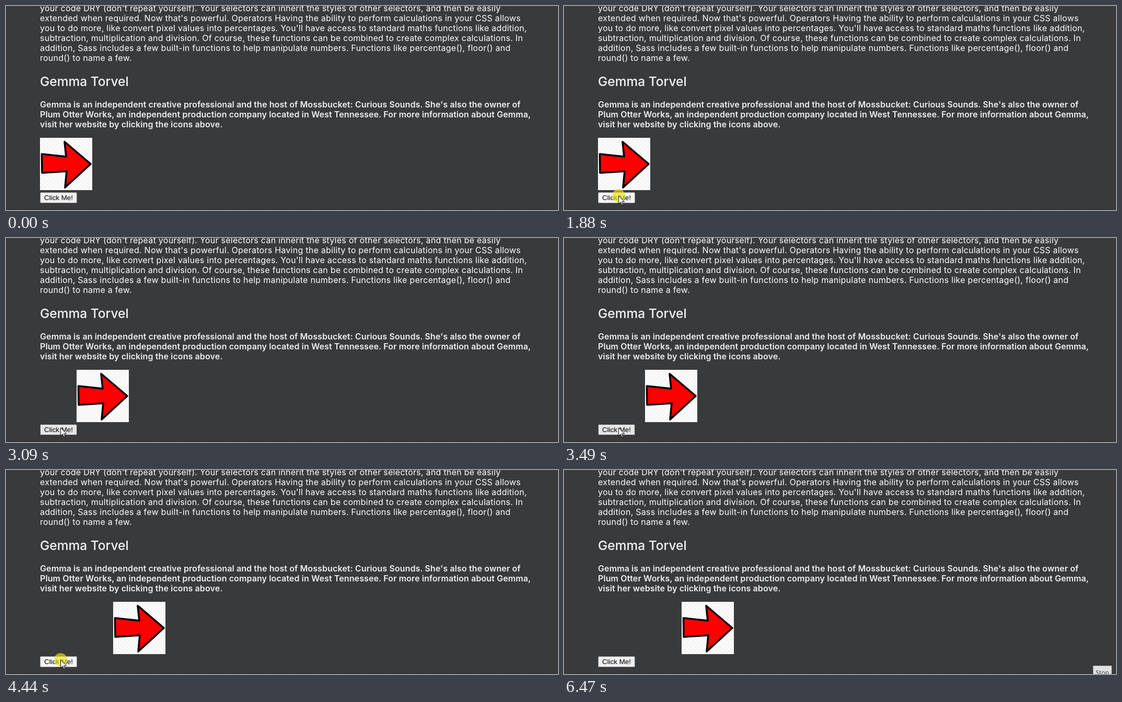
Recreate the animation shown at these times as an HTML page. Size 1056 px wide and 390 px high, loop 6540 ms.

```html
<!DOCTYPE html>
<html lang="en">
<head>
<meta charset="utf-8">
<title>Click to move</title>
<style>
html, body { margin: 0; width: 100%; height: 100%; overflow: hidden; background: #393a3c; }
#stage { position: relative; width: 1056px; height: 390px; overflow: hidden; background: #393a3c; color: #fff; }
#stage > * { position: absolute; margin: 0; box-sizing: border-box; }
p, h2 { left: 65px; white-space: nowrap; font-family: Inter, "Open Sans", sans-serif; }
p { font-size: 16px; line-height: 19px; }
.body { top: -5px; font-weight: 400; letter-spacing: .26px; }
h2 { top: 130px; font-size: 24.5px; line-height: 29px; font-weight: 500; color: #f4f4f4; }
.bio { top: 179px; font-weight: 600; letter-spacing: .1px; color: #f0f0f0; }
#arrow {
  left: 65px; top: 252px; width: 100px; height: 100px;
  background: repeating-conic-gradient(#f5f5f5 0 25%, #fbfbfb 0 50%) 0 0 / 8px 8px;
}
#button {
  left: 65px; top: 356px; width: 71px; height: 21px;
  border: 1px solid #767676; border-radius: 2px; background: #efefef; color: #000;
  font: 13.333px/19px "Liberation Sans", Arial, sans-serif; text-align: center;
}
#button.hover { background: #e5e5e5; border-color: #4f4f4f; }
#button.down { background: #f5f5f5; border-color: #8d8d8d; }
#glow { left: 92px; top: 350px; width: 25px; height: 25px; border-radius: 50%; background: rgba(238, 226, 20, .66); }
#cursor { left: 0; top: 0; width: 13px; height: 20px; }
#stop {
  left: 1012px; top: 374px; width: 36px; height: 24px;
  border: 1px solid #adadad; background: #e1e1e1; color: #333;
  font: 12px/25px "Open Sans", sans-serif; text-align: center;
}
.edge { left: 0; bottom: 0; width: 100%; height: 3px; background: linear-gradient(#393a3c, #303133); }
</style>
</head>
<body>
<div id="stage">
  <p class="body">your code DRY (don't repeat yourself). Your selectors can inherit the styles of other selectors, and then be easily<br>
extended when required. Now that's powerful. Operators Having the ability to perform calculations in your CSS allows<br>
you to do more, like convert pixel values into percentages. You'll have access to standard maths functions like addition,<br>
subtraction, multiplication and division. Of course, these functions can be combined to create complex calculations. In<br>
addition, Sass includes a few built-in functions to help manipulate numbers. Functions like percentage(), floor() and<br>
round() to name a few.</p>
  <h2>Gemma Torvel</h2>
  <p class="bio">Gemma is an independent creative professional and the host of Mossbucket: Curious Sounds. She's also the owner of<br>
Plum Otter Works, an independent production company located in West Tennessee. For more information about Gemma,<br>
visit her website by clicking the icons above.</p>
  <svg id="arrow" viewBox="0 0 100 100">
    <defs>
      <linearGradient id="red" x1="0" y1="0" x2="0" y2="1">
        <stop offset=".8" stop-color="#f00"/>
        <stop offset="1" stop-color="#b00000"/>
      </linearGradient>
    </defs>
    <path d="M3.5 31 L50 36 L47 7.5 L97 50 L48 95 L51 64 L4 67 Z"
      fill="url(#red)" stroke="#000" stroke-width="3.6" stroke-linejoin="round"/>
  </svg>
  <div class="edge"></div>
  <div id="button">Click Me!</div>
  <div id="glow"></div>
  <div id="stop">Stop</div>
  <svg id="cursor" viewBox="0 0 13 20">
    <path d="M.5 .8 V16.5 L4.2 13 L6.7 18.8 L8.9 17.8 L6.5 12.2 H11.6 Z" fill="#fff" stroke="#000"/>
  </svg>
</div>
<script>
const LOOP = 6540, FRAME = 70, JUMP = 10;
const CLICKS = 16, FIRST_PRESS = 1880;
const HOME = [104, 362];
const el = id => document.getElementById(id);
const [arrow, button, glow, cursor, stop] = ["arrow", "button", "glow", "cursor", "stop"].map(el);

// Clicks come in quick groups of four, with a longer hold between groups.
const release = n => 1930 + 690 * Math.floor((n + 1) / 4) + 150 * ((n + 1) % 4);
const press = n => n ? release(n - 1) + FRAME : FIRST_PRESS;

const mix = (a, b, k) => a.map((v, i) => v + (b[i] - v) * k);
const easeOut = k => 1 - (1 - k) ** 2;
const easeInOut = k => k * k * (3 - 2 * k);
const progress = (t, from, to) =>
  Math.min(1, Math.floor((t - from) / FRAME) * FRAME / (to - from));

// The pointer comes in, rests on the button, leaves, then peeks over the lower edge.
function pointer(t) {
  if (t >= 70 && t < 4780) return mix([373, 330], HOME, easeOut(progress(t, 70, 480)));
  if (t >= 4780 && t < 5190) return mix(HOME, [975, 380], easeInOut(progress(t, 4780, 5190)));
  if (t >= 5590 && t < 5870) {
    const k = progress(t, 5590, 5870);
    return [930 + 24 * k, 385 - 8 * Math.sin(Math.PI * k)];
  }
  return null;
}

function draw(t) {
  let moves = 0, down = false;
  for (let n = 0; n < CLICKS; n++) {
    if (t >= release(n)) moves++;
    else if (t >= press(n)) down = true;
  }
  const spot = pointer(t);
  const [x, y] = spot || [0, 0];
  const hover = x >= 65 && x < 136 && y >= 356 && y < 377;

  arrow.style.transform = `translateX(${moves * JUMP}px)`;
  button.className = down ? "down" : hover ? "hover" : "";
  glow.style.visibility = down ? "visible" : "hidden";
  cursor.style.visibility = spot ? "visible" : "hidden";
  cursor.style.transform = `translate(${Math.round(x)}px, ${Math.round(y)}px)`;
  stop.style.opacity = t < 6400 ? 0 : t < 6470 ? .5 : 1;
}

function tick() {
  draw(performance.now() % LOOP);
  requestAnimationFrame(tick);
}
tick();
</script>
</body>
</html>
```
